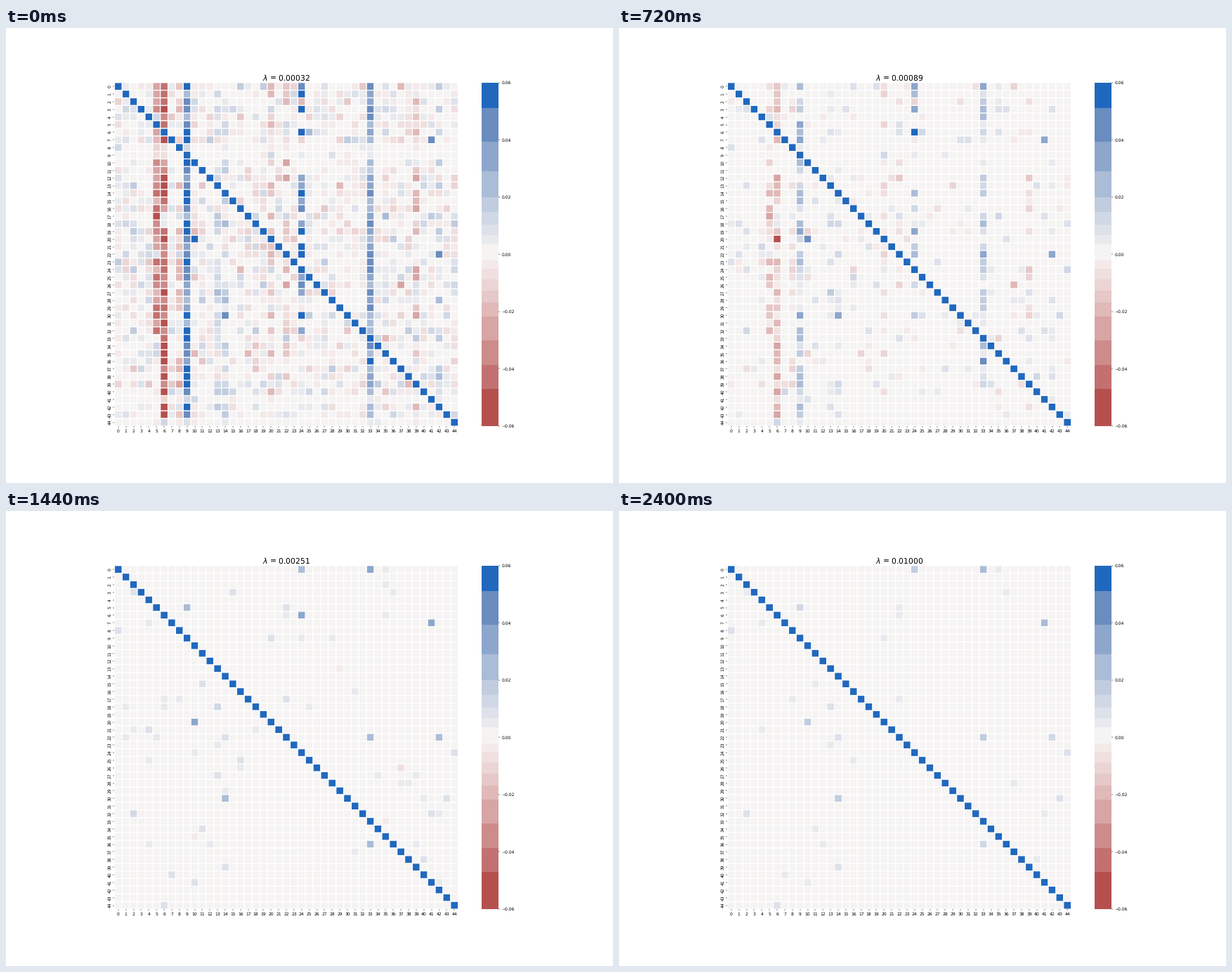
Write a matplotlib script that moves like this. It is 864 by 648 pixels and loops after 2640 ms.

```python
import numpy as np
import matplotlib.pyplot as plt
from matplotlib.animation import FuncAnimation
from matplotlib.colors import BoundaryNorm, LinearSegmentedColormap, ListedColormap

W, H, DPI = 864, 648, 43.2
N, STEPS, STEP_MS = 45, 11, 240
LIMIT = 60  # colour range, in thousandths

EDGES = [-60, -47, -38.7, -30, -21.7, -16.8, -12.6, -8.7, -5, -2,
         3.5, 6.7, 10.4, 14.8, 20, 29, 39.4, 51.1, 60]

# Leading columns: (typical weight, share of rows filled)
COLUMNS = {5: (-40, 1), 6: (-50, 1), 9: (53, 1), 24: (55, .6), 33: (37, 1),
           8: (-20, .5), 13: (14, .4), 14: (20, .5), 20: (-18, .4),
           22: (-23, .4), 39: (-24, .4), 42: (20, .3)}
QUIET_ROWS = [8, 9, 41, 44]

# Slowest cells: row, column, weight, steps until gone
LASTING = [(20, 10, 60, 14), (7, 41, 40, 24), (30, 14, 45, 15), (5, 9, 50, 13),
           (22, 33, 42, 16), (22, 42, 44, 14), (36, 33, 52, 13),
           (6, 24, 90, 10), (20, 6, -170, 6)]


def build_weights():
    rng = np.random.default_rng(7)

    # Faint noise that shrinks away first
    weight = rng.laplace(0, 4, (N, N))
    life = 1 + np.abs(weight) / 3.5

    for col, (level, share) in COLUMNS.items():
        size = rng.uniform(0.5, 1.2, N)
        rows = rng.random(N) < share
        if col in (5, 24):
            rows[33:] = False
        weight[rows, col] = level * size[rows]
        life[rows, col] = 5 * size[rows]
    weight[QUIET_ROWS] *= 0.2

    # Sparse pale blue cells that stay for long
    pale = rng.random((N, N)) < 0.04
    weight[pale] = np.maximum(weight[pale], rng.uniform(5, 14, pale.sum()))
    life[pale] = np.maximum(life[pale], rng.uniform(6, 25, pale.sum()))

    for row, col, w, steps in LASTING:
        weight[row, col], life[row, col] = w, steps
    return weight, life


WEIGHT, LIFE = build_weights()


def matrix(step):
    m = WEIGHT * np.clip(1 - step / LIFE, 0, 1)
    np.fill_diagonal(m, LIMIT)
    return np.clip(m, 0.1 - LIMIT, LIMIT - 0.1)


def stepped_palette():
    ramp = LinearSegmentedColormap.from_list(
        "ramp", ["#ad3d3c", "#f8f5f4", "#3c6aae"])
    edges = np.array(EDGES)
    centres = (edges[1:] + edges[:-1]) / 2
    colors = list(ramp((centres + LIMIT) / (2 * LIMIT)))
    colors[-1] = "#2068be"
    return ListedColormap(colors), BoundaryNorm(edges, len(colors))


def pixel_axes(x, y, w, h):
    return fig.add_axes([x / W, 1 - (y + h) / H, w / W, h / H])


plt.rcParams["font.family"] = "DejaVu Sans"
plt.rcParams["text.hinting"] = "none"
fig = plt.figure(figsize=(W / DPI, H / DPI), dpi=DPI, facecolor="white")

ax = pixel_axes(154.44, 77.76, 489.24, 489.24)
cmap, norm = stepped_palette()
mesh = ax.pcolormesh(matrix(0), cmap=cmap, norm=norm, edgecolors="white",
                     linewidth=2, antialiased=True, snap=False)
ax.set(xlim=(0, N), ylim=(N, 0))
ax.set_xticks(np.arange(N) + 0.5, range(N))
ax.set_yticks(np.arange(N) + 0.5, range(N), rotation=90, va="center")
ax.tick_params(axis="y", pad=3)
ax.spines[:].set_visible(False)
title = ax.set_title("", fontsize=18, pad=4.8)

cax = pixel_axes(677.16, 77.76, 24.2, 489.24)
bar = fig.colorbar(mesh, cax=cax, spacing="proportional", drawedges=False)
ticks = np.linspace(-LIMIT, LIMIT, 7)
bar.set_ticks(ticks, labels=[f"{t / 1000:.2f}".replace("-", "\u2212")
                             for t in ticks])
bar.minorticks_off()
bar.outline.set_visible(False)


def update(step):
    mesh.set_array(matrix(step))
    title.set_text(rf"$\lambda$ = {10 ** (-3.5 + 0.15 * step):.5f}")
    return mesh, title


anim = FuncAnimation(fig, update, frames=STEPS, interval=STEP_MS,
                     repeat=True, repeat_delay=0, blit=False)
plt.show()
```
